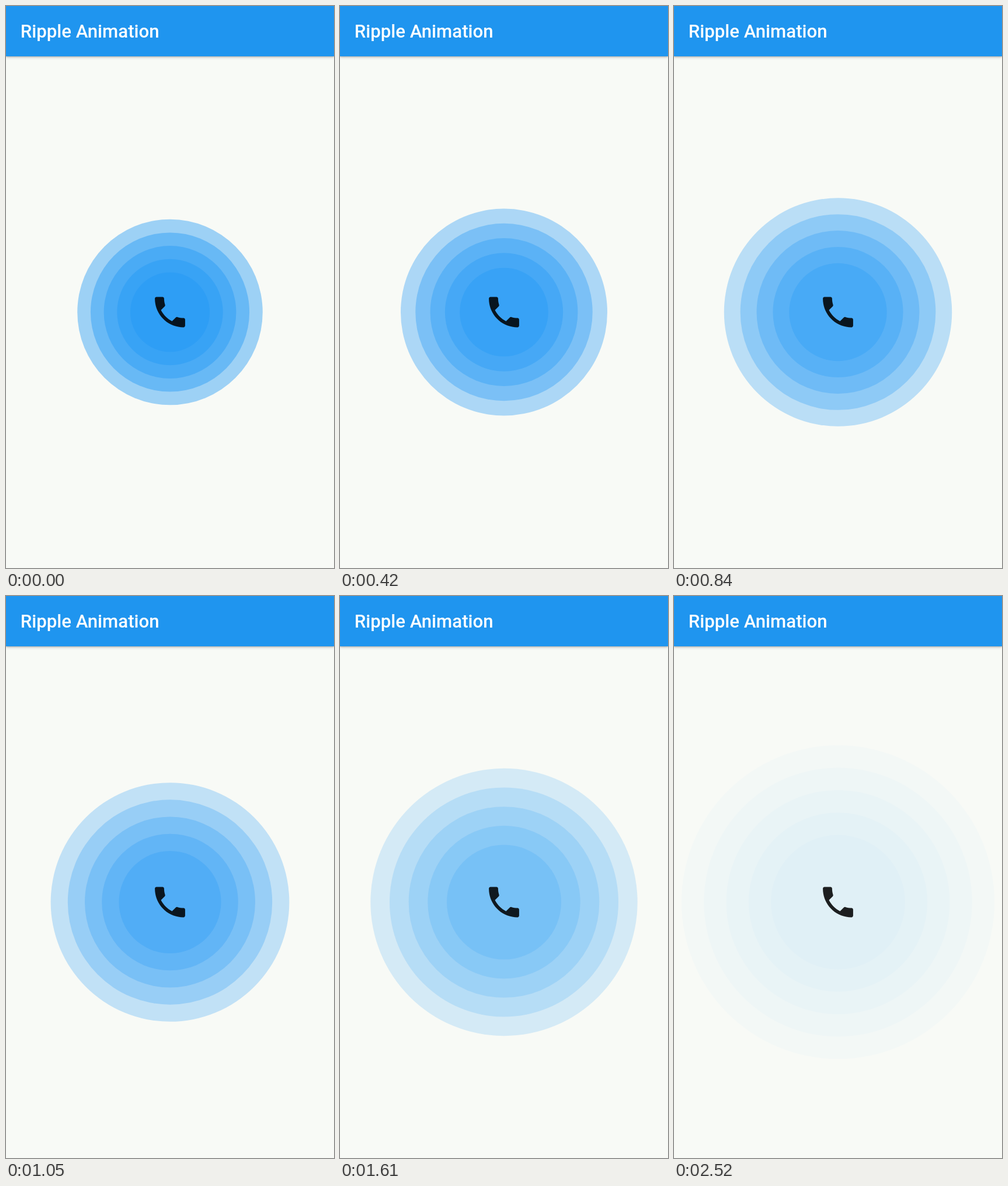
Write an HTML page that moves like this. It is 562 by 961 pixels and loops after 2.59 s.

```html
<!DOCTYPE html>
<html lang="en">
<head>
<meta charset="utf-8">
<title>Ripple Animation</title>
<style>
  html, body {
    margin: 0;
    width: 100%;
    height: 100%;
    overflow: hidden;
    background: #f8faf6;
  }
  svg {
    position: absolute;
    inset: 0;
    display: block;
  }
  header {
    position: absolute;
    inset: 0 0 auto;
    height: 86px;
    background: #1f95ef;
    box-shadow: 0 1px 2px rgba(0, 0, 0, .22), 0 2px 5px rgba(0, 0, 0, .16);
  }
  .title {
    font: 500 31.2px Roboto, sans-serif;
    fill: #fff;
  }
  .ring {
    fill: #2196f3;
    animation: ripple 2590ms steps(37, end) infinite;
  }
  /* Radius grows with v while opacity is 1 - v; v gains 1/90 per step. */
  @keyframes ripple {
    from { r: calc(var(--size) * .58); fill-opacity: .42; }
    to { r: calc(var(--size) * .9911); fill-opacity: .0089; }
  }
</style>
</head>
<body>
<header></header>
<svg width="562" height="961" viewBox="0 0 562 961">
  <text class="title" x="24.7" y="54">Ripple Animation</text>
  <g transform="translate(281 523.5)">
    <circle class="ring" style="--size: 117.3px"/>
    <circle class="ring" style="--size: 156.4px"/>
    <circle class="ring" style="--size: 195.5px"/>
    <circle class="ring" style="--size: 234.6px"/>
    <circle class="ring" style="--size: 273.7px"/>
    <path transform="scale(2.88) translate(-12 -12)" fill-opacity=".87"
      d="M6.62 10.79c1.44 2.83 3.76 5.14 6.59 6.59l2.2-2.2c.27-.27.67-.36 1.02-.24 1.12.37 2.33.57 3.57.57.55 0 1 .45 1 1V20c0 .55-.45 1-1 1-9.39 0-17-7.61-17-17 0-.55.45-1 1-1h3.5c.55 0 1 .45 1 1 0 1.25.2 2.45.57 3.57.11.35.03.74-.25 1.02z"/>
  </g>
</svg>
</body>
</html>
```
